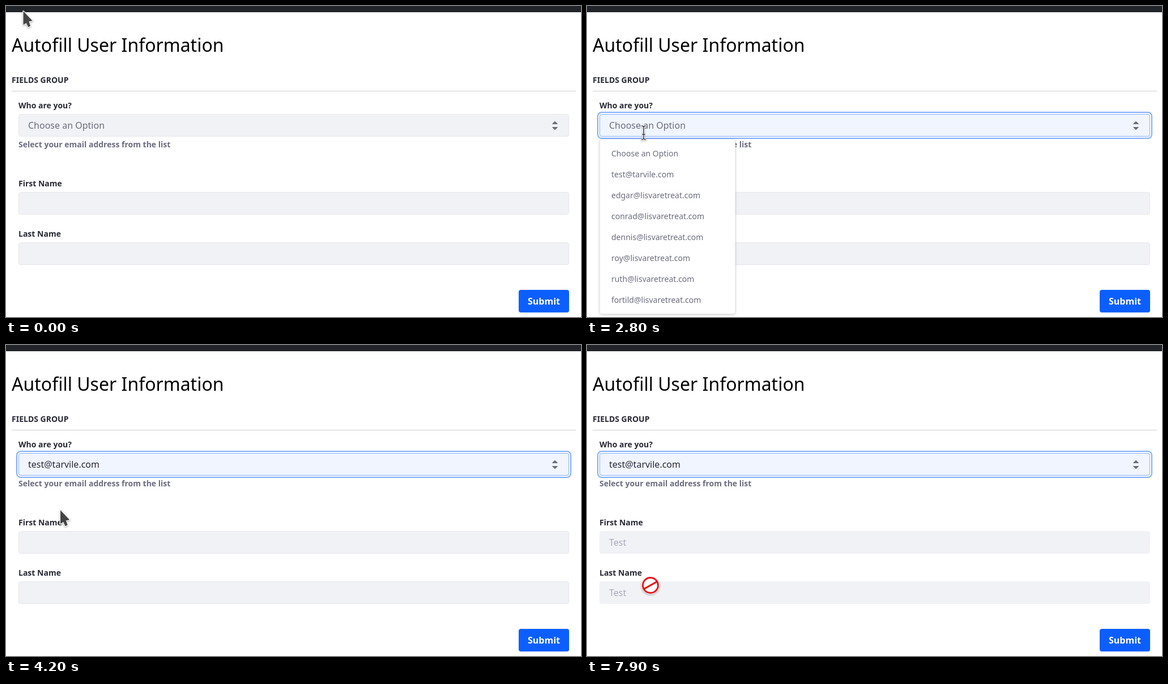
An HTML page for the animation above (8 s loop, 1015 by 550 pixels).

```html
<!DOCTYPE html>
<html lang="en">
<head>
<meta charset="utf-8">
<title>Autofill form</title>
<style>
  :root { --ink: #272833; --muted: #6b6c7e; --soft: #f0f5ff; --focus: #80acff; }
  * { box-sizing: border-box; }
  html, body { margin: 0; width: 100%; height: 100%; overflow: hidden; background: #fff; }
  body { position: relative; font: 16px/24px "Noto Sans", sans-serif; color: var(--ink); }
  body > *, .field > *, #cursor > * { position: absolute; }
  h1, p { margin: 0; white-space: nowrap; }

  .bar { left: 0; right: 0; top: 0; height: 10.6px; background: #212529; }
  h1 { left: 10px; top: 49px; font-size: 32px; line-height: 40px; font-weight: 500; color: #000; }
  .label { left: 22px; font-size: 14px; line-height: 20px; font-weight: 600; }
  .rule { left: 10px; width: 996px; top: 150px; height: 1px; background: #cdced9; }

  .field { left: 22px; width: 972px; height: 40px; border: 1px solid #e7e7ed; border-radius: 4px; background: #f1f2f5; }
  .field p { left: 16px; top: 7px; color: var(--muted); }
  .field .picked { color: var(--ink); }
  .field .filled { color: #a7a9bc; }
  .ring { inset: -1px; border: 1px solid var(--focus); border-radius: 4px; background: var(--soft);
          box-shadow: 0 0 0 2px #fff, 0 0 0 4px var(--focus); }
  .carets { left: 940px; top: 11px; fill: var(--muted); stroke: var(--muted); stroke-linejoin: round; }

  .list { left: 22px; top: 235px; width: 240px; height: 310px; padding: 6px 0; border: 1px solid #e7e7ed;
          border-radius: 4px; background: #fff; box-shadow: 0 1px 5px -1px rgba(0,0,0,.3);
          font-size: 14px; line-height: 37px; color: var(--muted); }
  .list p { padding-left: 20px; height: 37px; }
  .submit { left: 905px; top: 502px; width: 89px; height: 40px; border-radius: 4px; background: #0b5fff;
            color: #fff; font-weight: 600; line-height: 40px; text-align: center; }

  #cursor { left: 0; top: 0; width: 0; height: 0; }
  #cursor svg { left: 0; top: 0; width: 1px; height: 1px; overflow: visible;
                filter: drop-shadow(0 1.5px 1.5px rgba(0,0,0,.35)); }
  .dark { fill: #444; stroke: #fff; stroke-width: 2.4; stroke-linejoin: round; paint-order: stroke; }

  /* 1% = 80 ms; every state holds until the next key */
  .ring, .list, .row0, .row1, .prompt, .picked, .filled, .plain, #cursor, #cursor svg {
    animation: 8s step-end infinite; }
  .ring { animation-name: ring; }
  .list { animation-name: list; }
  .row0 { animation-name: row0; }
  .row1 { animation-name: row1; }
  .prompt { animation-name: prompt; }
  .picked { animation-name: picked; }
  .filled { animation-name: filled; }
  .plain { animation-name: plain; }
  #cursor { animation-name: move; }
  #cursor .arrow { animation-name: arrow; }
  #cursor .beam { animation-name: beam; }
  #cursor .hand { animation-name: hand; }
  #cursor .block { animation-name: block; }

  @keyframes ring { 0% { opacity: 0 } 27.5% { opacity: .6 } 28.75% { opacity: 1 }
                    50% { opacity: .4 } 51.25% { opacity: .7 } 52.5%, 100% { opacity: 1 } }
  @keyframes list { 0%, 51.25%, 100% { opacity: 0 } 27.5% { opacity: 1 } }
  @keyframes row0 { 36.25% { background: var(--soft); color: var(--ink) }
                    0%, 41.25%, 100% { background: #fff; color: var(--muted) } }
  @keyframes row1 { 41.25% { background: var(--soft); color: var(--ink) }
                    0%, 51.25%, 100% { background: #fff; color: var(--muted) } }
  @keyframes prompt { 0% { opacity: 1 } 51.25%, 100% { opacity: 0 } }
  @keyframes picked { 0% { opacity: 0 } 51.25%, 100% { opacity: 1 } }
  @keyframes filled { 0% { opacity: 0 } 67.5%, 100% { opacity: 1 } }
  @keyframes plain { 0% { border-color: #e7e7ed } 67.5%, 100% { border-color: #f1f2f5 } }

  @keyframes arrow { 0%, 51.25%, 90% { opacity: 1 } 20%, 81.25%, 92.5%, 100% { opacity: 0 } }
  @keyframes beam { 0%, 36.25%, 100% { opacity: 0 } 20% { opacity: 1 } }
  @keyframes hand { 0%, 51.25%, 100% { opacity: 0 } 36.25% { opacity: 1 } }
  @keyframes block { 0%, 90% { opacity: 0 } 81.25%, 92.5%, 100% { opacity: 1 } }

  @keyframes move {
    0% { transform: translate(30.5px, 9px) }
    11.25% { transform: translate(24px, 18px) }
    12.5% { transform: translate(15px, 45px) }
    13.75% { transform: translate(17px, 82px) }
    15% { transform: translate(29px, 118px) }
    16.25% { transform: translate(49px, 148px) }
    17.5% { transform: translate(74px, 171px) }
    18.75% { transform: translate(93px, 185px) }
    20% { transform: translate(99px, 215px) }
    21.25% { transform: translate(100px, 206px) }
    35% { transform: translate(100px, 224px) }
    36.25% { transform: translate(99px, 243px) }
    37.5% { transform: translate(98px, 250px) }
    38.75% { transform: translate(97px, 259px) }
    40% { transform: translate(96px, 270px) }
    41.25% { transform: translate(96px, 283px) }
    42.5% { transform: translate(96px, 292px) }
    78.75% { transform: translate(94px, 301.5px) }
    80% { transform: translate(92px, 314px) }
    81.25% { transform: translate(99px, 346px) }
    88.75% { transform: translate(100px, 354px) }
    90% { transform: translate(102px, 378px) }
    91.25% { transform: translate(108px, 401px) }
    92.5% { transform: translate(115px, 427px) }
    93.75% { transform: translate(112.5px, 426px) }
    98.75%, 100% { transform: translate(112px, 425px) }
  }
</style>
</head>
<body>
  <div class="bar"></div>
  <h1>Autofill User Information</h1>
  <p class="label" style="left:10px;top:121px">FIELDS GROUP</p>
  <div class="rule"></div>

  <p class="label" style="top:166px">Who are you?</p>
  <div class="field" style="top:191px">
    <div class="ring"></div>
    <p class="prompt">Choose an Option</p>
    <p class="picked">test@tarvile.com</p>
    <svg class="carets" width="12" height="18"><path d="M1.5 5.5L6 1.3l4.5 4.2zM1.5 11.5L6 15.7l4.5-4.2z"/></svg>
  </div>
  <p class="label" style="top:235px;color:var(--muted)">Select your email address from the list</p>

  <p class="label" style="top:304px">First Name</p>
  <div class="field plain" style="top:329px"><p class="filled">Test</p></div>
  <p class="label" style="top:393px">Last Name</p>
  <div class="field plain" style="top:418px"><p class="filled">Test</p></div>
  <div class="submit">Submit</div>

  <div class="list">
    <p class="row0">Choose an Option</p>
    <p class="row1">test@tarvile.com</p>
    <p>edgar@lisvaretreat.com</p>
    <p>conrad@lisvaretreat.com</p>
    <p>dennis@lisvaretreat.com</p>
    <p>roy@lisvaretreat.com</p>
    <p>ruth@lisvaretreat.com</p>
    <p>fortild@lisvaretreat.com</p>
  </div>

  <div id="cursor">
    <svg class="arrow"><path class="dark" d="M0 0V24.5L5.2 21 8.6 28.2 12.6 26.6 10 18.2 16.3 17.2Z"/></svg>
    <svg class="beam">
      <g fill="none" stroke-linecap="round">
        <path id="bar" stroke="#fff" stroke-width="3.6" d="M-3.5-12Q0-12 0-9.5 0-12 3.5-12M0-9.5V9.5M-3.5 12Q0 12 0 9.5 0 12 3.5 12"/>
        <path stroke="#444" stroke-width="1.6" d="M-3.5-12Q0-12 0-9.5 0-12 3.5-12M0-9.5V9.5M-3.5 12Q0 12 0 9.5 0 12 3.5 12M-2 3H2"/>
      </g>
    </svg>
    <svg class="hand"><path class="dark" d="M-2.8 2Q-2.8-1 0-1T3 2V9Q7 7.5 8.5 10 12 9 13 11.5 16 11 16 15V21L13.5 28.5H-.5Q-2 24-6 20L-9.5 16Q-10.5 13.5-8 12.7-6 12.5-2.8 15.5Z"/></svg>
    <svg class="block">
      <circle r="16" fill="#fff"/>
      <g fill="none" stroke="#e8141c" stroke-width="3"><circle r="13.5"/><path d="M-11.8 6.6L11.8-6.6"/></g>
    </svg>
  </div>
</body>
</html>
```
